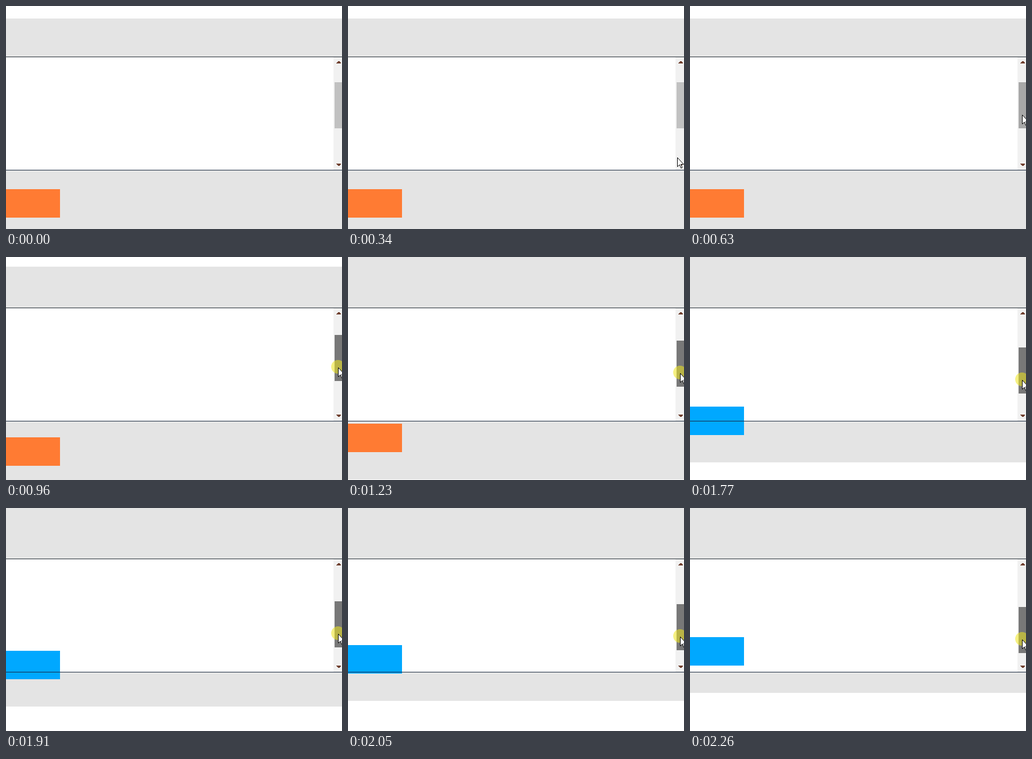
An HTML page for the animation above (2610 ms loop, 591 by 392 pixels).

```html
<!DOCTYPE html>
<html lang="en">
<head>
<meta charset="utf-8">
<title>Scroll trigger</title>
<style>
  html, body { margin: 0; width: 100%; height: 100%; overflow: hidden; background: #fff; }
  svg { display: block; }
</style>
</head>
<body>
<svg width="591" height="392" viewBox="0 0 591 392" shape-rendering="crispEdges">
  <rect width="591" height="392" fill="#fff"/>
  <rect id="section" width="591" height="398" fill="#e4e4e4"/>
  <rect y="90" width="591" height="198" fill="#fff"/>
  <rect id="box" width="95" height="50"/>
  <rect y="89" width="591" height="1" fill="#202a32"/>
  <rect y="288" width="591" height="1" fill="#16263c"/>
  <rect x="576" y="90" width="15" height="198" fill="#f1f1f1"/>
  <path d="M581 101v-1l3-3h2l3 3v1z M581 277v1l3 3h2l3-3v-1z" fill="#70402f"/>
  <rect id="thumb" x="578" width="13" height="81"/>
  <circle id="press" cx="584" r="12" fill="#eee61e" fill-opacity=".55" shape-rendering="auto"/>
  <path id="cursor" d="M.5.5v16l3.7-3.5 2.6 6 2.2-1-2.6-5.7h5z" fill="#fff" stroke="#000" shape-rendering="auto"/>
</svg>
<script>
const LOOP = 2610, STEP = 70, ENTER = 70, ARRIVE = 630, PRESS = 830;
const THUMB_RATIO = 0.42;
// Drag milestones: [time, scrolled pixels]
const DRAG = [[0, 0], [PRESS, 0], [960, 5], [1230, 29], [1510, 51], [1840, 63], [1910, 71], [2260, 95]];

const $ = id => document.getElementById(id);
const set = (id, attrs) => {
  for (const k in attrs) $(id).setAttribute(k, attrs[k]);
};
const show = on => on ? 'visible' : 'hidden';

// Time snapped to the steps that follow each milestone, and the scroll there
function sample(time) {
  const i = DRAG.findLastIndex(([t]) => t <= time);
  const [t0, a] = DRAG[i];
  const t = t0 + Math.floor((time - t0) / STEP) * STEP;
  const [t1, b] = DRAG[i + 1] || [LOOP, a];
  return { t, scroll: Math.round(a + (b - a) * (t - t0) / (t1 - t0)) };
}

function cursorPos(t, thumbY) {
  const rest = Math.max(0, (ARRIVE - t) / (ARRIVE - ENTER)) ** 2;
  return [Math.round(584 - 12 * rest), Math.round(thumbY + 57 + 192 * rest)];
}

function draw(time) {
  const { t, scroll } = sample(time);
  const boxY = 322 - scroll;
  const thumbY = 134 + Math.ceil(scroll * THUMB_RATIO);
  const [x, y] = cursorPos(t, thumbY);
  const shown = t >= ENTER, pressed = t >= PRESS;
  const hover = shown && x >= 578 && y < thumbY + 81;

  set('section', { y: boxY - 300 });
  set('box', { y: boxY, fill: boxY < 288 ? '#00a8ff' : '#ff7b33' });
  set('thumb', { y: thumbY, fill: pressed ? '#787878' : hover ? '#a8a8a8' : '#c1c1c1' });
  set('press', { cy: y - 1, visibility: show(pressed) });
  set('cursor', { transform: `translate(${x} ${y})`, visibility: show(shown) });
}

const start = performance.now();
function frame() {
  draw((performance.now() - start) % LOOP);
  requestAnimationFrame(frame);
}
draw(0);
requestAnimationFrame(frame);
</script>
</body>
</html>
```
